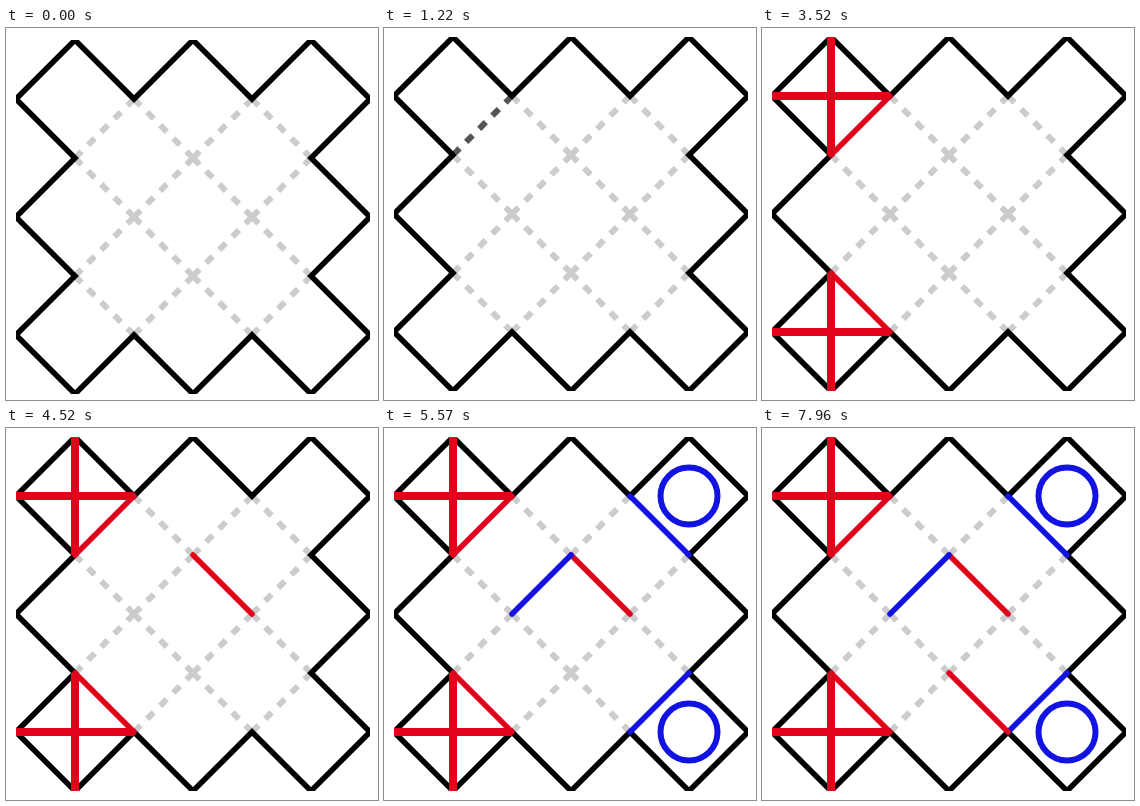
Recreate the animation shown at these times as an HTML page with a canvas. Size 372 by 372 pixels, loop 8 s.

```html
<!DOCTYPE html>
<html lang="en">
<head>
<meta charset="utf-8">
<title>Line and box game</title>
<style>
html, body { margin: 0; width: 100%; height: 100%; overflow: hidden; background: #fff; }
canvas { display: block; }
</style>
</head>
<body>
<canvas id="stage" width="372" height="372"></canvas>
<script>
const ctx = document.getElementById('stage').getContext('2d');
const LOOP = 8000, FADE = 300, STEP = 59;
const RED = '#e1021c', BLUE = '#1212e2', GREY = '#ccc', HOVER = '#555';
const DASH = STEP * Math.SQRT2 / 9;

// Lattice coordinates run from 0 to 6 on both axes.
const px = i => 10 + i * STEP;
const py = j => 9 + j * STEP;

const border = [
  [1, 0], [2, 1], [3, 0], [4, 1], [5, 0], [6, 1], [5, 2], [6, 3], [5, 4], [6, 5],
  [5, 6], [4, 5], [3, 6], [2, 5], [1, 6], [0, 5], [1, 4], [0, 3], [1, 2], [0, 1]
];

// Each move claims an edge; some also complete a square centred on box.
const moves = [
  { at: 1220, edge: [2, 1, 1, 2], color: RED, box: [1, 1] },
  { at: 2350, edge: [1, 4, 2, 5], color: RED, box: [1, 5] },
  { at: 4050, edge: [3, 2, 4, 3], color: RED },
  { at: 4650, edge: [4, 1, 5, 2], color: BLUE, box: [5, 1] },
  { at: 4930, edge: [5, 4, 4, 5], color: BLUE, box: [5, 5] },
  { at: 5230, edge: [3, 2, 2, 3], color: BLUE },
  { at: 6950, edge: [3, 4, 4, 5], color: RED }
];

// Inner edges of the board: both diagonals of every inner cell.
const edges = [];
for (let j = 1; j < 5; j++) {
  for (let i = 1; i < 5; i++) {
    edges.push((i + j) % 2 ? [i, j, i + 1, j + 1] : [i + 1, j, i, j + 1]);
  }
}

const clamp = v => Math.max(0, Math.min(1, v));
const progress = (move, t) => clamp((t - move.at - 40) / (FADE - 40));

function line([a, b, c, d], color, width) {
  ctx.strokeStyle = color;
  ctx.lineWidth = width;
  ctx.beginPath();
  ctx.moveTo(px(a), py(b));
  ctx.lineTo(px(c), py(d));
  ctx.stroke();
}

function drawDashes(t) {
  ctx.lineCap = 'butt';
  ctx.setLineDash([DASH, DASH]);
  for (const edge of edges) {
    const move = moves.find(m => m.edge.join() === edge.join());
    ctx.globalAlpha = move ? 1 - progress(move, t) : 1;
    line(edge, move && t >= move.at ? HOVER : GREY, 6);
  }
  ctx.setLineDash([]);
  ctx.globalAlpha = 1;
}

function drawBorder() {
  ctx.strokeStyle = '#000';
  ctx.lineWidth = 5.5;
  ctx.beginPath();
  for (const [i, j] of border) ctx.lineTo(px(i), py(j));
  ctx.closePath();
  ctx.stroke();
}

function drawMove(move, t) {
  const { edge, color, box } = move;
  ctx.globalAlpha = progress(move, t);
  ctx.lineCap = 'round';
  line(edge, color, 5.5);
  if (!box) return;
  const [i, j] = box;
  if (color === RED) {
    ctx.lineCap = 'butt';
    line([i, j - 1, i, j + 1], color, 8);
    line([i - 1, j, i + 1, j], color, 8);
  } else {
    ctx.lineWidth = 6;
    ctx.beginPath();
    ctx.arc(px(i), py(j), 28.5, 0, 2 * Math.PI);
    ctx.stroke();
  }
}

function draw(t) {
  ctx.fillStyle = '#fff';
  ctx.fillRect(0, 0, 372, 372);
  ctx.save();
  ctx.translate(0, t < 40 ? 3 : t < 90 ? 1.5 : 0);
  ctx.beginPath();
  ctx.rect(px(0), py(0), 6 * STEP, 6 * STEP);
  ctx.clip();
  drawDashes(t);
  drawBorder();
  for (const move of moves) drawMove(move, t);
  ctx.restore();
}

const start = performance.now();
function frame() {
  draw((performance.now() - start) % LOOP);
  requestAnimationFrame(frame);
}
frame();
</script>
</body>
</html>
```
